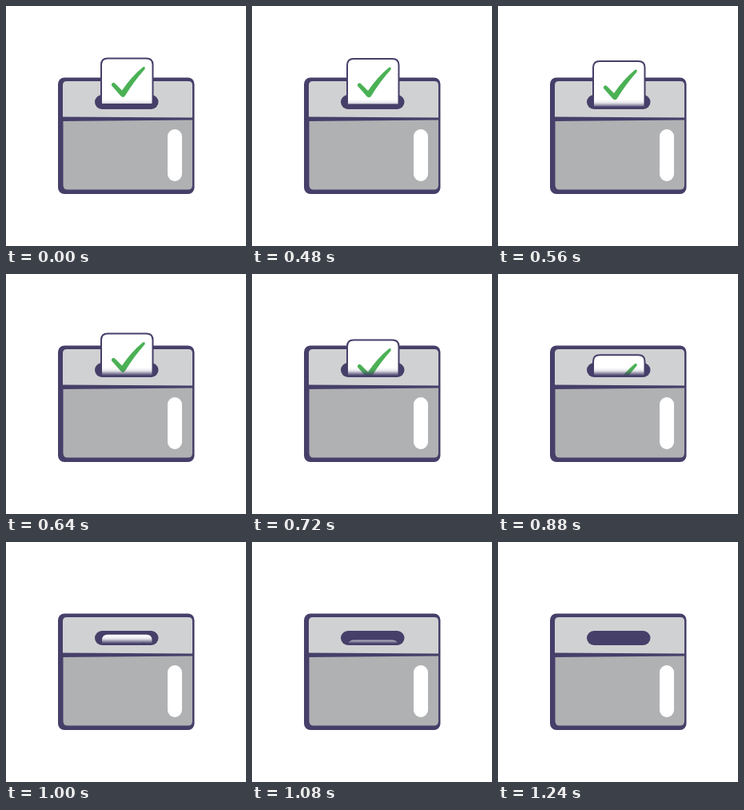
Recreate the animation shown at these times as an HTML page. Size 300 by 300 pixels, loop 1640 ms.

```html
<!DOCTYPE html>
<html lang="en">
<head>
<meta charset="utf-8">
<title>Ballot box</title>
<style>
  html, body { margin: 0; width: 100%; height: 100%; overflow: hidden; background: #fff; }
  svg { display: block; width: 100%; height: 100%; }
</style>
</head>
<body>
<svg viewBox="0 0 300 300">
  <defs>
    <linearGradient id="fade" gradientUnits="userSpaceOnUse" x1="0" y1="117" x2="0" y2="127">
      <stop offset="0" stop-color="#fff"/>
      <stop offset=".4" stop-color="#ddd"/>
      <stop offset="1" stop-color="#000"/>
    </linearGradient>
    <mask id="slotMask" maskUnits="userSpaceOnUse" x="0" y="0" width="300" height="127">
      <rect width="300" height="127" fill="url(#fade)"/>
    </mask>
  </defs>

  <!-- box -->
  <rect x="65" y="89.5" width="170.5" height="145.5" rx="8" fill="#463f69"/>
  <path d="M71 138.5V99q0-5 5-5H228q5 0 5 5V139.5Z" fill="#d0d1d3"/>
  <path d="M71.5 144L233 142.5V224q0 5.5-5.5 5.5H77q-5.500 0-5.500-5.500Z" fill="#b0b1b3"/>
  <rect x="202" y="154" width="18" height="65" rx="9" fill="#fff"/>
  <rect x="111" y="111" width="79.500" height="18" rx="9" fill="#463f69"/>

  <!-- ballot sliding into the slot -->
  <g mask="url(#slotMask)">
    <g id="ballot">
      <path d="M119 122V73.500q0-8 8-8H175.500q8 0 8 8V122" fill="#fff" stroke="#463f69" stroke-width="2"/>
      <path d="M132 97.500Q134 94 137 97.500L145 105.500Q157 88 171 76.500Q174.500 75 173.500 79Q160 94 149 112Q146.500 115.500 143.500 112.500Q137 105 132.500 100Q131.500 99 132 97.500Z" fill="#4bb155"/>
    </g>
  </g>
</svg>
<script>
  const LOOP = 1640, STEP = 40, START = 440, END = 1240, DROP = 62;
  const ballot = document.getElementById('ballot');
  const easeInOut = u => (1 - Math.cos(Math.PI * u)) / 2;

  function draw(now) {
    const t = Math.floor((now % LOOP) / STEP) * STEP;
    const u = Math.min(1, Math.max(0, (t - START) / (END - START)));
    ballot.setAttribute('transform', `translate(0 ${DROP * easeInOut(u)})`);
    requestAnimationFrame(draw);
  }
  draw(performance.now());
</script>
</body>
</html>
```
